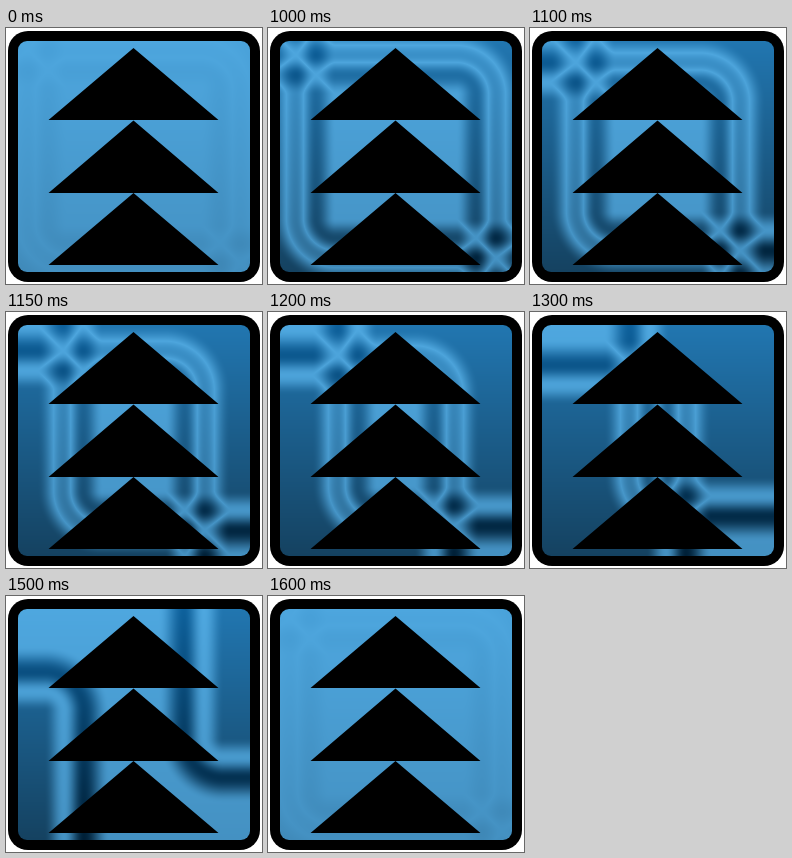
Animation of 256 by 256 pixels, one loop 1650 ms. Source, as an HTML page with a canvas:

```html
<!DOCTYPE html>
<html lang="en">
<head>
<meta charset="utf-8">
<title>Ripple arrows</title>
<style>
html, body { margin: 0; width: 100%; height: 100%; overflow: hidden; background: #fff; }
.panel { position: absolute; left: 2px; top: 3px; width: 252px; height: 251px; border-radius: 20px; background: #000; }
canvas { position: absolute; left: 12px; top: 13px; border-radius: 9px; }
svg { position: absolute; left: 0; top: 0; }
</style>
</head>
<body>
<div class="panel"></div>
<canvas id="water" width="232" height="231"></canvas>
<svg width="256" height="256">
  <path d="M127.5 20L212.5 92H42.5Z M127.5 92.5L212.5 165H42.5Z M127.5 165L212.5 237H42.5Z"/>
</svg>
<script>
const LOOP = 1650, STEP = 50, REST = 1000, END = 1600;
const LEFT = 12, TOP = 13, RADIUS = 40;
const OUTER = 26, BAND = 20, INSIDE = 0.7;
// Colours at the top and bottom edge.
const LIGHT = [[78, 167, 223], [68, 145, 194]];
const DARK = [[14, 97, 156], [0, 32, 55]];

const canvas = document.getElementById('water');
const ctx = canvas.getContext('2d');
const { width, height } = canvas;
const image = ctx.createImageData(width, height);
const mix = (a, b, k) => a + (b - a) * k;
const ease = k => (1 - Math.cos(Math.PI * Math.min(1, Math.max(0, k)))) / 2;

// Signed distance to a quadrant whose upper right corner is rounded.
function distance(x, y, cx, cy) {
  const qx = x - cx + RADIUS, qy = cy - y + RADIUS;
  return Math.hypot(Math.max(qx, 0), Math.max(qy, 0)) + Math.min(Math.max(qx, qy), 0) - RADIUS;
}

// Clear outside, a dark ridge at the edge, a clear dip, then an even inside.
function wave(d) {
  if (d >= 0) return 1 - ease(d / OUTER);
  if (d >= -BAND) return 1 - ease(-d / BAND);
  return INSIDE * ease(-d / BAND - 1);
}

function draw(time) {
  const resting = time < REST || time >= END;
  const u = (time - REST) / 100;
  const cx = resting ? 234 : 228 - 15 * u - 3 * u * u;
  const cy = resting ? 22 : 27 + 7 * u + 0.55 * u * u;
  const strength = resting ? 0.09 : 1;
  let i = 0;
  for (let row = 0; row < height; row++) {
    const k = row / (height - 1), y = row + TOP + 0.5;
    const light = LIGHT[0].map((c, n) => mix(c, LIGHT[1][n], k));
    const dark = DARK[0].map((c, n) => mix(c, DARK[1][n], k));
    for (let col = 0; col < width; col++) {
      const x = col + LEFT + 0.5;
      const a = wave(distance(x, y, cx, cy));
      const b = wave(distance(256 - x, 257 - y, cx, cy));
      const shade = Math.abs(a - b) * strength;
      for (let n = 0; n < 3; n++) image.data[i++] = mix(light[n], dark[n], shade);
      image.data[i++] = 255;
    }
  }
  ctx.putImageData(image, 0, 0);
}

const start = performance.now();
let shown = -1;
function tick() {
  const now = Math.max(0, performance.now() - start) % LOOP;
  const time = Math.floor(now / STEP) * STEP;
  if (time !== shown) {
    draw(time);
    shown = time;
  }
  requestAnimationFrame(tick);
}
tick();
</script>
</body>
</html>
```
